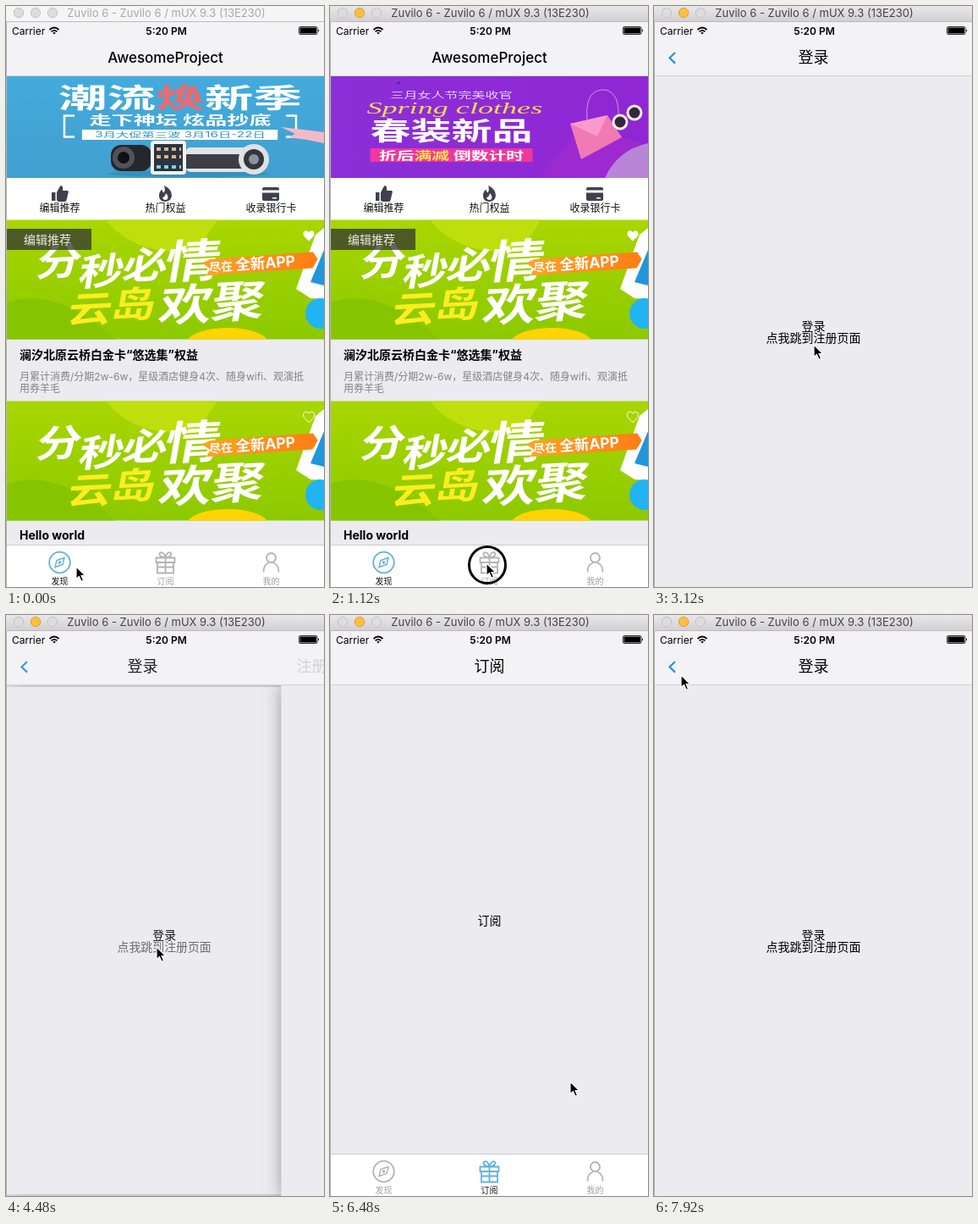
These frames come from a looping animation (376x686 px, 8 s). An HTML page:

```html
<!DOCTYPE html>
<html lang="zh-CN">
<head>
<meta charset="utf-8">
<title>App navigation</title>
<style>
  html, body { margin: 0; width: 100%; height: 100%; overflow: hidden; background: #ebebf0; }
  #stage { position: relative; width: 376px; height: 686px; overflow: hidden; background: #ebebf0;
    font-family: Inter, "Noto Sans CJK SC", "Noto Sans CJK", sans-serif; }
  svg { position: absolute; left: 0; top: 0; display: block; }
  #cards { position: absolute; left: 1px; top: 83px; width: 375px; height: 603px; overflow: hidden; }
  .card { position: absolute; inset: 0; background: #ebebf0; box-shadow: 0 0 18px rgba(0, 0, 0, .34); }
  .mid { text-anchor: middle; }
  .title { font-size: 18px; font-weight: 500; text-anchor: middle; }
  .body { font-size: 14px; text-anchor: middle; }
  .light { fill: #dddddf; stroke: #c3c3c5; }
  #windowTitle { font-size: 13px; fill: #a9a9ab; }
  .active #windowTitle { fill: #434345; }
  .active #minimise { fill: #fdbe41; stroke: #dfa034; }
  #barActive, .active #barIdle { display: none; }
  .active #barActive { display: inline; }
  .tab { color: #b3b3b6; fill: none; stroke: currentColor; stroke-width: 1.8; }
  .tab text { fill: #a0a0a3; stroke: none; font-size: 10px; text-anchor: middle; }
  .tab.on { color: #62b2dc; }
  .tab.on text { fill: #111; }
  .shortcut { fill: #3f404d; }
  .shortcut text { fill: #111; font-size: 12px; text-anchor: middle; }
  .heavy { font-weight: 900; }
</style>
</head>
<body>
<div id="stage">
  <svg id="chrome" width="376" height="686">
    <defs>
      <linearGradient id="bar" x2="0" y2="1"><stop stop-color="#e9e7ea"/><stop offset="1" stop-color="#d2d0d3"/></linearGradient>
    </defs>
    <rect id="barIdle" width="376" height="18" fill="#f5f5f6"/>
    <rect id="barActive" width="376" height="18" fill="url(#bar)"/>
    <path d="M0 18.5H376" stroke="#bdbbbe"/>
    <circle class="light" cx="15" cy="8" r="5.7"/>
    <circle class="light" id="minimise" cx="35" cy="8" r="5.7"/>
    <circle class="light" cx="55" cy="8" r="5.7"/>
    <text id="windowTitle" class="mid" x="189.5" y="13">Zuvilo 6 - Zuvilo 6 / mUX 9.3 (13E230)</text>

    <rect y="19" width="376" height="64" fill="#f3f3f5"/>
    <path d="M0 82.5H376" stroke="#d3d3d6"/>
    <text x="7" y="34" font-size="12">Carrier</text>
    <g fill="none" stroke="#000" stroke-width="1.7">
      <path d="M51.5 28Q57 23 62.5 28M53.6 30.4Q57 27.4 60.4 30.4"/>
      <path d="M57 33.5L55.2 31.6Q57 30.3 58.8 31.6Z" fill="#000" stroke="none"/>
    </g>
    <text class="mid" x="189.5" y="34" font-size="12" font-weight="600">5:20 PM</text>
    <rect x="346.5" y="24.5" width="21.5" height="9" rx="1.5" fill="none" stroke="#000" stroke-width=".8"/>
    <rect x="347.5" y="25.5" width="19.5" height="7" fill="#000"/>
    <path d="M369 27.3q2 1.7 0 3.4z"/>

    <g class="head"><text class="title" id="tabTitle" x="188.5" y="67"></text></g>
    <g class="head"><text class="title" x="188.5" y="67">登录</text></g>
    <g class="head"><text class="title" x="188.5" y="67">注册</text></g>
    <path class="back" d="M25 55L18.5 61.3L25 67.6" fill="none" stroke="#2590dc" stroke-width="2.2"/>
    <path class="back" d="M25 55L18.5 61.3L25 67.6" fill="none" stroke="#2590dc" stroke-width="2.2"/>
    <path d="M.5 19V686" stroke="#b4b4b8"/>
  </svg>

  <div id="cards">
    <div class="card">
      <svg width="375" height="603" viewBox="1 83 375 603">
        <defs>
          <linearGradient id="sky" x2="0" y2="1"><stop stop-color="#43abdc"/><stop offset="1" stop-color="#419fd0"/></linearGradient>
          <linearGradient id="violet"><stop stop-color="#8b2fd8"/><stop offset="1" stop-color="#9026d4"/></linearGradient>
          <linearGradient id="leaf" x2="0" y2="1"><stop stop-color="#a9d600"/><stop offset="1" stop-color="#8cc900"/></linearGradient>
          <linearGradient id="ribbon"><stop stop-color="#ffa326"/><stop offset="1" stop-color="#ff7d14"/></linearGradient>
          <clipPath id="promoBox"><rect x="1" y="252.5" width="375" height="141"/></clipPath>
          <path id="heart" d="M358 277.5C353.5 273.5 351.5 271.5 351.5 268.8C351.5 264.5 356.5 264 358 267.3C359.5 264 364.5 264.5 364.5 268.8C364.5 271.5 362.5 273.5 358 277.5Z"/>
          <g id="promo" clip-path="url(#promoBox)">
            <rect x="1" y="252" width="375" height="142" fill="url(#leaf)"/>
            <path d="M1 394V350Q60 330 130 394Z" fill="#86c400"/>
            <path d="M118 252H250L225 290Q150 295 118 252Z" fill="#bfdf0c"/>
            <ellipse cx="262" cy="398" rx="48" ry="18" fill="#ffd400"/>
            <path d="M343 334L366 270L376 262V346L360 345Z" fill="#fff"/>
            <path d="M360 326L376 288V330Z" fill="#2196dc"/>
            <circle cx="372" cy="363" r="18" fill="#22b3f2"/>
            <g class="heavy" fill="#fff" transform="translate(0 330) skewX(-10) skewY(-3) translate(0 -330) scale(1.2 1)">
              <text x="26.5 70 112" y="321 335 330" font-size="44">分秒必</text>
              <text x="153" y="332" font-size="54">情</text>
              <text x="66 108" y="379 376" font-size="43" fill="#f9ee20">云岛</text>
              <text x="155 206" y="383 382" font-size="52">欢聚</text>
            </g>
            <g transform="rotate(-4 298 305)">
              <path d="M232 299L242 295H364L369 304L362 314H236L241 306Z" fill="url(#ribbon)"/>
              <text x="240" y="310" font-size="14" font-weight="700" fill="#fff">尽在 <tspan font-size="17.5">全新APP</tspan></text>
            </g>
          </g>
        </defs>

        <g id="slides">
          <g>
            <rect x="1" y="83" width="375" height="120" fill="url(#sky)"/>
            <g fill="#fff" class="mid" transform="translate(206 0) scale(1.8 1)">
              <text class="heavy" y="120" font-size="32">潮流<tspan fill="#f0696c">焕</tspan>新季</text>
              <text y="140" font-size="14.5" font-weight="700">走下神坛 炫品抄底</text>
              <path d="M-64.5 146H64V158H-64.5Z"/>
              <text y="155.5" font-size="8.5" fill="#3290c4">3月大促第三波 3月16日-22日</text>
            </g>
            <path d="M81 129.5H69V154.5H81M331 129.5H343V154.5H331" fill="none" stroke="#fff" stroke-width="2.5"/>
            <path d="M376 149L352 146L325 143L342 151L334 155L356 158L376 162Z" fill="#f3b9c9"/>
            <ellipse cx="215" cy="198" rx="95" ry="4" fill="#378fbd"/>
            <rect x="124" y="164" width="48" height="31" rx="12" fill="#25272c"/>
            <circle cx="139" cy="179" r="13" fill="#50535a"/><circle cx="139" cy="179" r="7" fill="#111"/>
            <rect x="171" y="159" width="42" height="40" rx="4" fill="#f3f3f3"/>
            <rect x="175" y="163" width="34" height="32" fill="#2a3440"/>
            <path d="M178 169H207M178 178H207" stroke="#d8b880" stroke-width="4" stroke-dasharray="5 4"/>
            <path d="M178 190H207" stroke="#7ed0e6" stroke-width="4" stroke-dasharray="5 4"/>
            <rect x="213" y="167" width="84" height="29" rx="5" fill="#e2e3e5"/>
            <rect x="213" y="175" width="74" height="17" fill="#3d3f44"/>
            <circle cx="293" cy="181" r="18" fill="#dfe1e4"/><circle cx="293" cy="181" r="12" fill="#33363c"/>
            <circle cx="293" cy="181" r="6" fill="#8b909a"/>
          </g>
          <g transform="translate(375 0)">
            <rect x="1" y="83" width="375" height="120" fill="url(#violet)"/>
            <path d="M248 203L300 139L376 165V203Z" fill="#9d2ad0"/>
            <path d="M325 203Q340 170 376 162V203Z" fill="#b985d6"/>
            <g class="mid" fill="#fff" transform="translate(143.5 0) scale(1.6 1)">
              <text y="109" font-size="10" fill="#ead6fa">三月女人节完美收官</text>
              <text x="2" y="127" font-size="19" font-style="italic" fill="#f3dc4b" font-family="'Liberation Serif', serif" transform="scale(1.19 1)">Spring clothes</text>
              <text class="heavy" y="158" font-size="30">春装新品</text>
              <path d="M-60 168H60V184H-60Z" fill="#f0379e"/>
              <text y="181" font-size="13" font-weight="700">折后<tspan fill="#ffe34d">满减</tspan> 倒数计时</text>
            </g>
            <path d="M284 139L328 129L345 155L297 181Z" fill="#f07ab4"/>
            <path d="M284 139L328 129L316 154Z" fill="#f89bca"/>
            <path d="M304 134Q301 97 326 99Q342 103 341 130" fill="none" stroke="#c99bd0"/>
            <g fill="#33283f" stroke="#f6eee5" stroke-width="3">
              <circle cx="343" cy="137" r="8"/><circle cx="360" cy="126" r="8"/>
            </g>
            <path d="M79 91l4-2-2 4z" fill="#4b1680"/>
          </g>
        </g>

        <rect x="1" y="203" width="375" height="50" fill="#fff"/>
        <g class="shortcut">
          <path d="M54 220h4.5v10H54zM60 220L64 212.5Q68 211.5 67 218H73Q74.5 219 73.5 221L71.5 229.5Q71 231 69 231H62L60 229.5Z"/>
          <text x="63.5" y="242.5">编辑推荐</text>
        </g>
        <g class="shortcut">
          <path d="M187 212Q196 216 196 224Q195 231 188 231Q181 230.5 181 224Q181 219 184.5 216.5Q184.5 219.5 186.5 220.5Q189 217 187 212Z"/>
          <path d="M189 221Q193 225 190.5 228.5Q186 230 185 226Q188 226 189 221Z" fill="#fff"/>
          <text x="188.5" y="242.5">热门权益</text>
        </g>
        <g class="shortcut">
          <rect x="303" y="214" width="20" height="16" rx="2"/>
          <path d="M303 217.5h20v3h-20zM315 226h5v1.5h-5z" fill="#fff"/>
          <text x="313.5" y="242.5">收录银行卡</text>
        </g>

        <use href="#promo"/>
        <rect x="1" y="263" width="100" height="25" fill="#323232" fill-opacity=".75"/>
        <text x="21" y="281" font-size="14" fill="#e8e8e8">编辑推荐</text>
        <use href="#heart" fill="#fff"/>
        <text x="16" y="416.5" font-size="14" font-weight="700">澜汐北原云桥白金卡“悠选集”权益</text>
        <g font-size="12" fill="#848488">
          <text x="16" y="441.5">月累计消费/分期2w-6w，星级酒店健身4次、随身wifi、观演抵</text>
          <text x="16" y="455.5">用券羊毛</text>
        </g>
        <use href="#promo" y="214"/>
        <use href="#heart" y="214" fill="none" stroke="#fff"/>
        <text x="16" y="630" font-size="14" font-weight="700">Hello world</text>

        <g id="subscribe">
          <rect x="1" y="83" width="375" height="603" fill="#ebebf0"/>
          <text class="body" x="188.5" y="365.5">订阅</text>
        </g>

        <rect x="1" y="636" width="375" height="50" fill="#fff"/>
        <path d="M1 636.5H376" stroke="#cbcbce"/>
        <g class="tab">
          <circle cx="63.5" cy="657" r="12.3"/>
          <path d="M58 662.5L60 654.5L69 651.5L67 659.5Z" stroke-width="1.5"/><circle cx="63.5" cy="657" r=".8"/>
          <text x="63.5" y="683">发现</text>
        </g>
        <g class="tab">
          <path d="M177.5 651.5H199.5V657H177.5ZM179 657V669.5H198V657M188.5 651.5V669.5M179 662.5H198M188.5 651C181 651 180 645.5 183.5 645.2Q186.5 645 188.5 651Q190.5 645 193.5 645.2C197 645.5 196 651 188.5 651"/>
          <text x="188.5" y="683">订阅</text>
        </g>
        <g class="tab">
          <circle cx="313.5" cy="651.5" r="5.5"/>
          <path d="M304.5 668.5Q304.5 659.5 311 657.5M316 657.5Q322.5 659.5 322.5 668.5"/>
          <text x="313.5" y="683">我的</text>
        </g>
      </svg>
    </div>
    <div class="card">
      <svg width="375" height="603" viewBox="1 83 375 603">
        <text class="body" x="188.5" y="382.5">登录</text>
        <text class="body" id="link" x="188.5" y="397">点我跳到注册页面</text>
      </svg>
    </div>
    <div class="card">
      <svg width="375" height="603" viewBox="1 83 375 603">
        <text class="body" x="188.5" y="389.5">注册</text>
      </svg>
    </div>
  </div>

  <svg width="376" height="686">
    <g id="pointer">
      <circle id="press" cx="1" cy="2" r="21.5" fill="none" stroke="#000" stroke-width="3"/>
      <path d="M0 0V14.5L3.4 11.4L6 17.3L8.6 16.2L6.1 10.5H10.6Z" stroke="#fff" stroke-width="1.2"/>
    </g>
  </svg>
</div>

<script>
  const LOOP = 8000, STEP = 80, PUSH = 250;
  const $ = id => document.getElementById(id);
  const all = selector => [...document.querySelectorAll(selector)];
  const cards = all('.card'), heads = all('.head'), backs = all('.back'), tabs = all('.tab');

  const ease = p => p < .5 ? 2 * p * p : 1 - 2 * (1 - p) ** 2;

  // Eased value of a track of [time, value] points.
  function track(points, t) {
    const next = points.findIndex(point => point[0] > t);
    if (next < 0) return points[points.length - 1][1];
    if (next === 0) return points[0][1];
    const [t0, a] = points[next - 1], [t1, b] = points[next];
    return a + (b - a) * ease((t - t0) / (t1 - t0));
  }

  const path = [
    [0, 83, 662], [320, 83, 662], [800, 185, 658], [1360, 185, 658], [1760, 320, 658],
    [2080, 320, 658], [2640, 189, 400], [3600, 189, 400], [4000, 178, 392], [4560, 178, 392],
    [4960, 22, 63], [5760, 22, 63], [6480, 284, 551], [6720, 314, 656], [7200, 314, 656],
    [7520, 190, 383], [7600, 190, 383], [7920, 32, 71]
  ];
  const pathX = path.map(([t, x]) => [t, x]);
  const pathY = path.map(([t, , y]) => [t, y]);
  const presses = [[240, 400], [1040, 1240], [1960, 2120], [4160, 4400], [5040, 5200], [5600, 5720], [7000, 7160]];
  const moves = [[2120, 0, 1], [4415, 1, 2], [5200, 2, 1], [5720, 1, 0], [7160, 0, 1]];
  const depthTrack = moves.flatMap(([t, from, to]) => [[t, from], [t + PUSH, to]]);
  const slideTrack = [[480, 0], [800, -375]];
  const linkTrack = [[4160, 1], [4240, .2], [4400, .2], [4520, .7], [4640, 1]];

  function placeCard(card, offset) {
    card.style.display = Math.abs(offset) < 1 ? 'block' : 'none';
    card.style.opacity = offset > 0 ? 1 - .7 * offset : 1;
    card.style.transform = offset > 0
      ? `translateX(${-10 * offset}px) scale(${1 - .05 * offset})`
      : `translateX(${-375 * offset}px)`;
  }

  function draw(t) {
    const depth = track(depthTrack, t);
    const tab = t < 1240 ? 0 : 1;
    const shown = i => Math.max(0, 1 - Math.abs(depth - i));

    $('chrome').classList.toggle('active', t >= 400);
    $('tabTitle').textContent = ['AwesomeProject', '订阅'][tab];
    $('tabTitle').style.fontSize = tab ? '18px' : '17px';
    $('subscribe').style.display = tab ? 'inline' : 'none';
    tabs.forEach((el, i) => el.classList.toggle('on', i === tab));
    $('slides').setAttribute('transform', `translate(${track(slideTrack, t)} 0)`);
    $('link').style.opacity = track(linkTrack, t);

    cards.forEach((card, i) => placeCard(card, depth - i));
    heads.forEach((head, i) => {
      head.style.opacity = shown(i);
      head.setAttribute('transform', `translate(${200 * (i - depth)} 0)`);
    });
    backs.forEach((back, i) => back.style.opacity = shown(i + 1));

    $('pointer').setAttribute('transform', `translate(${track(pathX, t)} ${track(pathY, t)})`);
    $('press').style.display = presses.some(([from, to]) => t >= from && t < to) ? 'inline' : 'none';
  }

  const start = performance.now();
  function tick() {
    const t = (performance.now() - start) % LOOP;
    draw(Math.floor(t / STEP) * STEP);
    requestAnimationFrame(tick);
  }
  tick();
</script>
</body>
</html>
```
